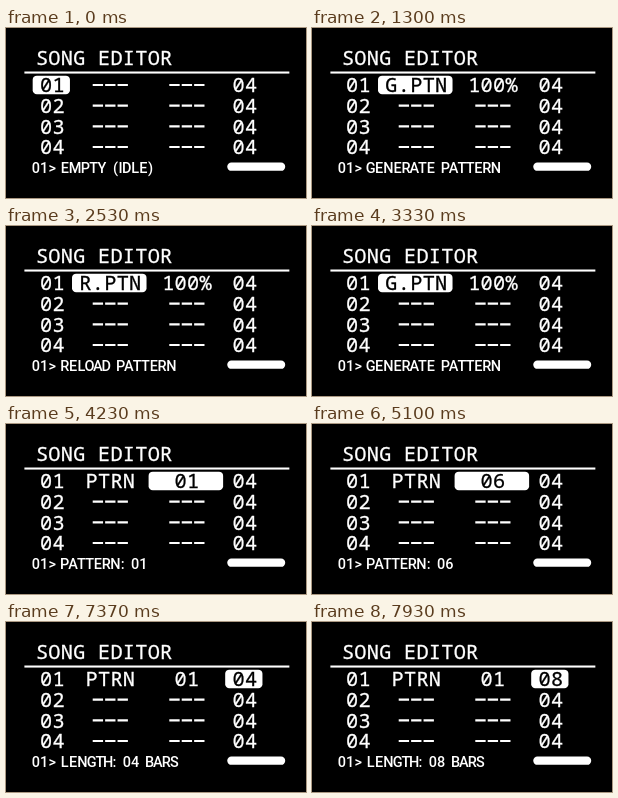
These frames come from a looping animation (300x170 px, 8 s). An HTML page:

```html
<!DOCTYPE html>
<html lang="en">
<head>
<meta charset="utf-8">
<title>Song editor</title>
<style>
  html, body { margin: 0; width: 100%; height: 100%; overflow: hidden; background: #000; }
  svg { display: block; width: 300px; height: 170px; }
  text { text-anchor: middle; white-space: pre; fill: #fff; }
  .big {
    font: 500 9.8px "Noto Sans Mono", "DejaVu Sans Mono", monospace;
    stroke: #fff; stroke-width: .14;
  }
  .small { font: 500 7px Roboto, "Liberation Sans", sans-serif; font-stretch: 75%; }
  .big.on { fill: #000; stroke: #000; }
  .dash { stroke: #fff; stroke-width: 1; stroke-dasharray: 5 1; }
  .dash.on { stroke: #000; }
</style>
</head>
<body>
<svg viewBox="0 0 300 170">
  <rect width="300" height="170" fill="#000"/>
  <g id="lcd" transform="translate(18.4 22.8) scale(2.07)"></g>
</svg>
<script>
const NS = 'http://www.w3.org/2000/svg';
const LOOP = 8000;
const NONE = '---';
const lcd = document.getElementById('lcd');

// Columns in display dots: text centre, cursor left edge and width
const COLS = [
  { mid: 14, left: 4, width: 18 },
  { mid: 42, left: 23, width: 36 },
  { mid: 79, left: 60, width: 36 },
  { mid: 107, left: 97, width: 18 }
];
// Footer letter widths that are not 4 dots
const WIDTHS = { N: 5, M: 6, ' ': 3, ':': 2, I: 2, '(': 3, ')': 3 };

function add(tag, attrs, text) {
  const el = document.createElementNS(NS, tag);
  for (const key in attrs) el.setAttribute(key, attrs[key]);
  if (text) el.textContent = text;
  lcd.append(el);
  return el;
}

function box(x, y, width, height, rx = 0) {
  return add('rect', { x, y, width, height, rx, fill: '#fff' });
}

// Places each letter in the middle of its cell
function write(str, x, y, cls, cell) {
  const xs = [...str].map(ch => {
    const w = cell(ch), mid = x + (w - 1) / 2;
    x += w;
    return mid.toFixed(2);
  });
  add('text', { x: xs.join(' '), y, class: cls }, str);
}

const big = (str, x, y, on) => write(str, x, y, on ? 'big on' : 'big', () => 6);
const small = (str, x) => write(str, x, 59, 'small', ch => WIDTHS[ch] || 4);

function field(str, col, row, on) {
  const x = COLS[col].mid - 3 * str.length;
  const top = 13 + 10 * row;
  if (str === NONE) {
    add('line', { x1: x, x2: x + 17, y1: top + 3.5, y2: top + 3.5, class: on ? 'dash on' : 'dash' });
  } else {
    big(str, x, top + 7, on);
  }
}

// A step: time, cursor column, type, value, length, footer
const pad = n => String(n).padStart(2, '0');
const steps = [];
const step = (at, col, type, value, len, note) => steps.push({ at, col, cells: ['01', type, value, len], note });

const pattern = (at, value) => step(at, 2, 'PTRN', value, '04', 'PATTERN: ' + value);
const bars = (at, n) => step(at, 3, 'PTRN', '01', pad(n), `LENGTH: ${pad(n)} BARS`);
const whole = (at, verb) => step(at, 1, verb[0] + '.PTN', '100%', '04', verb + ' PATTERN');
const track = (at, verb) => step(at, 1, verb[0] + '.TRK', '01', '04', verb + ' TRACK');
const play = at => step(at, 1, 'PTRN', '01', '04', 'PLAY PATTERN');

step(0, 0, NONE, NONE, '04', 'EMPTY (IDLE)');
step(100, 1, NONE, NONE, '04', 'EMPTY (IDLE)');
play(570);
whole(1300, 'GENERATE');
track(1600, 'GENERATE');
whole(1700, 'MUTATE');
track(1870, 'MUTATE');
whole(1970, 'RELOAD');
track(2130, 'RELOAD');
whole(2530, 'RELOAD');
track(2700, 'MUTATE');
whole(2800, 'MUTATE');
track(3070, 'GENERATE');
whole(3330, 'GENERATE');
play(3600);
pattern(4230, '01');
pattern(4430, '02');
pattern(4570, '03');
pattern(4670, '04');
pattern(4770, '05');
pattern(5100, '06');
pattern(5700, '05');
pattern(5800, '04');
pattern(5870, '02');
pattern(5970, '01');
pattern(6130, 'RND');
pattern(6800, '01');
bars(7370, 4);
bars(7730, 5);
bars(7800, 6);
bars(7870, 7);
bars(7930, 8);

function draw({ col, cells, note }) {
  lcd.replaceChildren();
  big('SONG EDITOR', 6, 7);
  box(0, 10, 128, 1);
  box(COLS[col].left, 12, COLS[col].width, 9, 2);
  cells.forEach((str, i) => field(str, i, 0, i === col));
  for (let row = 1; row < 4; row++) {
    [pad(row + 1), NONE, NONE, '04'].forEach((str, i) => field(str, i, row));
  }
  small('01', 4);
  small('>', 12);
  small(note, 18);
  box(98, 54, 28, 4, 2);
}

let shown;
function tick() {
  const t = performance.now() % LOOP;
  const now = steps.findLast(s => s.at <= t);
  if (now !== shown) draw(shown = now);
  requestAnimationFrame(tick);
}
tick();
</script>
</body>
</html>
```
